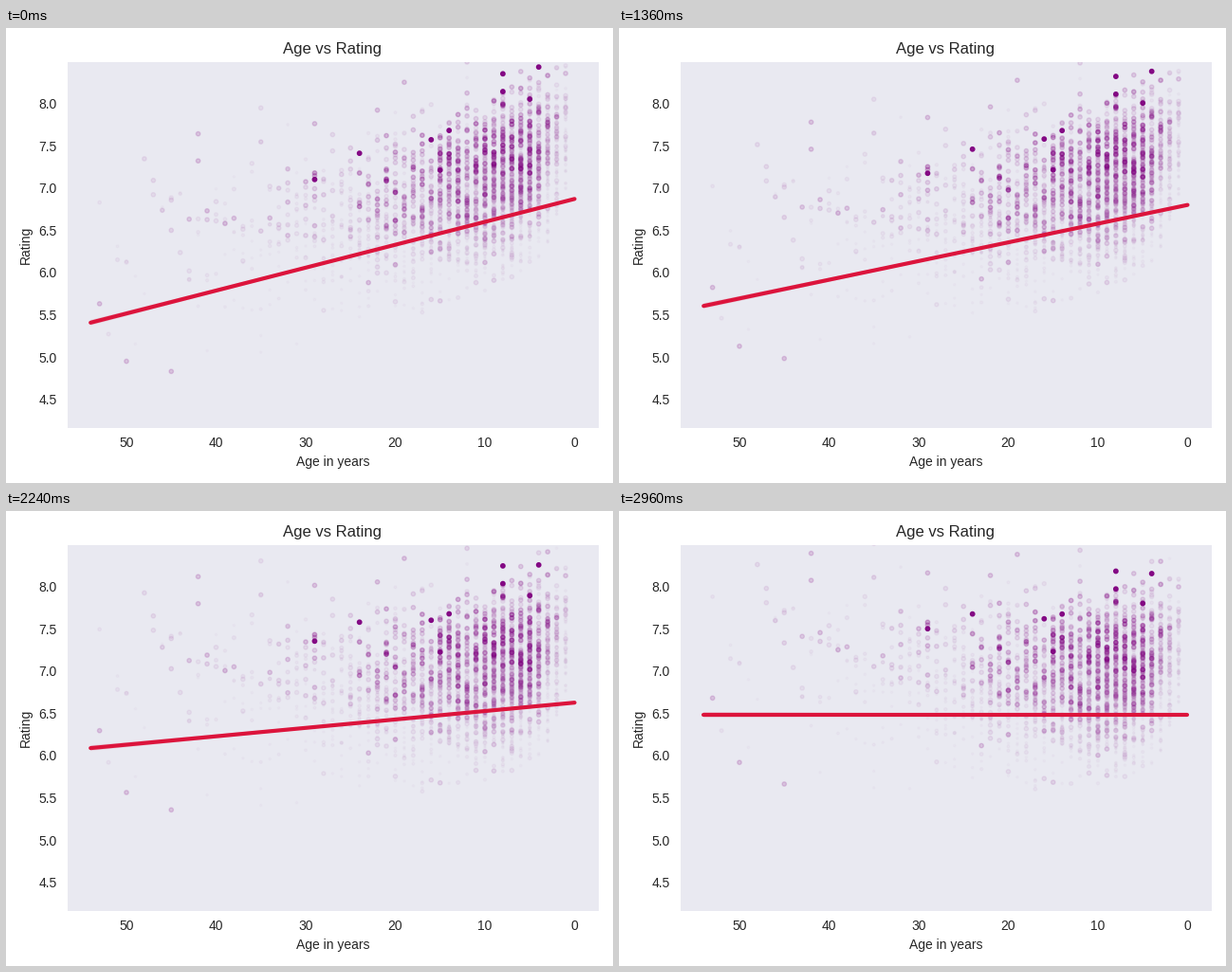
Animation of 640x480 px, one loop 5000 ms. Source, as a matplotlib script:

```python
import numpy as np
import matplotlib.pyplot as plt
from matplotlib.animation import FuncAnimation
from matplotlib.colors import to_rgb

SLOPE, PIVOT, MEAN = 0.0271, 14.28, 6.483
STEP, FRAMES = 40, 125
START, MOVES = 25, 49

plt.rcParams.update({
    "font.family": "Liberation Sans", "font.size": 10,
    "text.color": ".15", "axes.labelcolor": ".15",
    "xtick.color": ".15", "ytick.color": ".15",
})

# A few landmark dots: (age, rating)
DARK = [(29, 7.10), (24, 7.41), (8, 8.35), (8, 8.14), (16, 7.57),
        (14, 7.68), (15, 7.21), (5, 8.05), (4, 8.43)]
PALE = [(42, 7.64), (42, 7.32), (19, 8.25), (22, 7.92), (29, 7.76),
        (23, 5.88), (50, 4.95), (45, 4.83), (53, 5.63)]


def trend(age):
    return SLOPE * (age - PIVOT)


def make_dots():
    """Columns of dots per age: rating, opacity and size follow the votes."""
    rng = np.random.default_rng(12)
    rows = []
    for age in range(1, 54):
        old = max(0, age - 23)
        n = round(165 * min(1, (age + 1) / 6) * np.exp(-max(0, age - 9) / 9))
        floor = 5.6 + 1.5 * np.exp(-age / 2.5)
        mid = 6.82 + 0.6 * np.exp(-age / 3) + 0.015 * old
        spread = 0.46 + 0.006 * old
        level = floor + np.abs(rng.normal(mid, spread, n) - floor)
        votes = np.exp(1.1 * np.clip(level - 6.8, -0.8, 0.6)
                       + rng.normal(0, 0.8, n))
        fade = np.clip(age / 6, 0.25, 1) * np.clip((36 - age) / 18, 0.5, 1)
        alpha = np.clip(0.048 * fade * votes, 0.015, 0.55)
        size = np.clip(alpha * 190, 1, 10)
        rows += zip([age] * n, level - trend(age), alpha, size)
    rows += [(a, r, 0.16, 10) for a, r in PALE]
    rows += [(a, r, 0.95, 10) for a, r in DARK]
    return np.array(rows, float).T


fig = plt.figure(figsize=(6.4, 4.8), dpi=100, facecolor="white")
ax = fig.add_axes([65 / 640, 58.5 / 480, 560 / 640, 385.5 / 480],
                  facecolor="#E9E9F1")
for spine in ax.spines.values():
    spine.set_visible(False)
ax.tick_params(length=0, pad=7)
ax.tick_params(axis="y", pad=8)
ax.set_xlim(56.56, -2.7)
ax.set_ylim(4.166, 8.488)
ax.set_xticks(range(50, -1, -10))
ax.set_yticks(np.arange(4.5, 8.1, 0.5))
ax.set_title("Age vs Rating", fontsize=12, x=0.4985, pad=6.5)
ax.set_xlabel("Age in years")
ax.set_ylabel("Rating", labelpad=4.8)

age, rating, alpha, size = make_dots()
shift = trend(age)
colors = np.column_stack([np.tile(to_rgb("purple"), (len(age), 1)), alpha])
dots = ax.scatter(age, rating, s=size, c=colors, linewidths=1, zorder=2)

ends = np.array([54.0, PIVOT, 0.0])
margin = 0.008 + 0.0006 * np.abs(ends - PIVOT)
band, = ax.fill(np.r_[ends, ends[::-1]], np.zeros(6), color="crimson",
                alpha=0.15, lw=0, zorder=3)
line, = ax.plot(ends, ends, color="crimson", lw=3, solid_capstyle="round",
                zorder=4)


def update(i):
    p = min(max((i - START) / MOVES, 0), 1)
    dots.set_offsets(np.column_stack([age, rating + p * shift]))
    fit = MEAN - (1 - p) * trend(ends)
    line.set_ydata(fit)
    edge = np.r_[fit + margin, (fit - margin)[::-1]]
    band.set_xy(np.column_stack([np.r_[ends, ends[::-1]], edge]))
    return dots, band, line


anim = FuncAnimation(fig, update, frames=FRAMES, interval=STEP,
                     init_func=lambda: update(0), repeat=True, repeat_delay=0)
plt.show()
```
